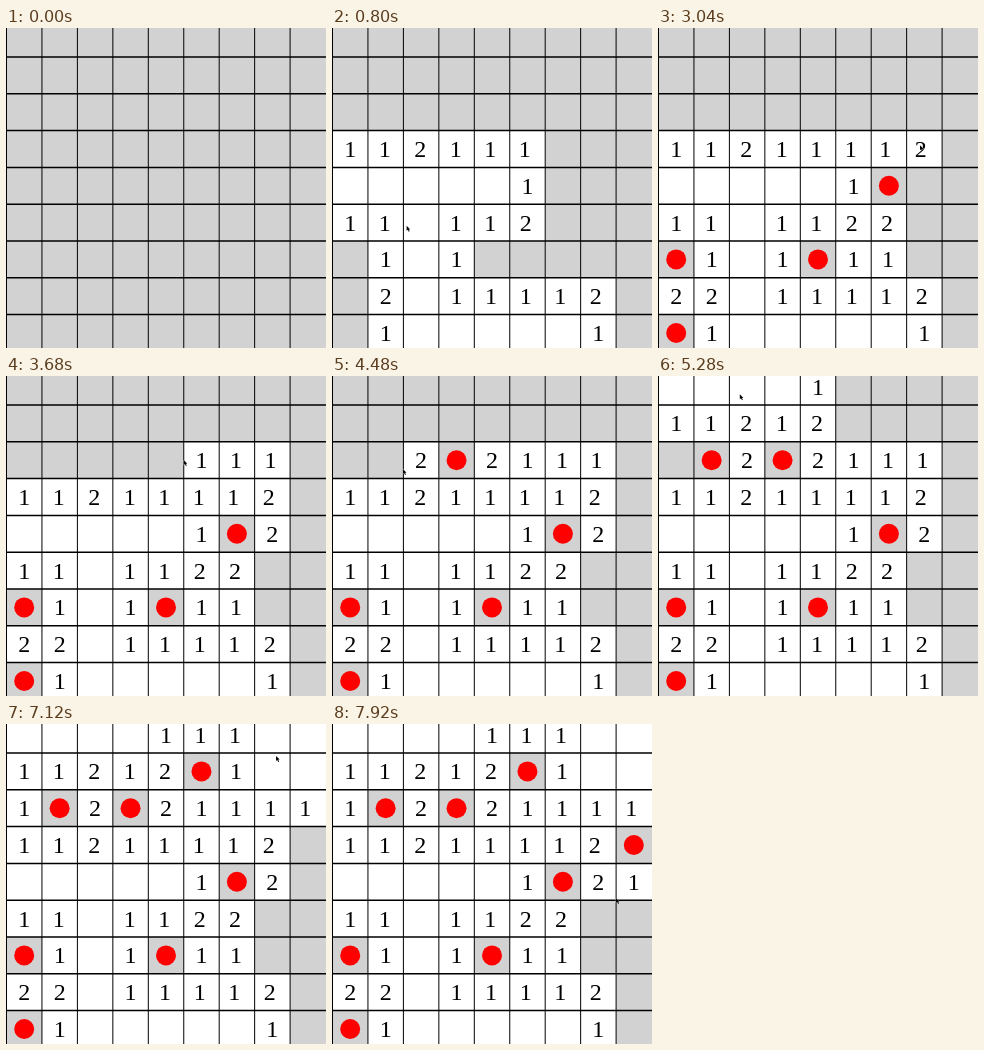
Recreate the animation shown at these times as an HTML page without scripts. Size 320 px wide and 320 px high, loop 8000 ms.

```html
<!DOCTYPE html>
<html lang="en">
<head>
<meta charset="utf-8">
<title>Minesweeper</title>
<style>
  html, body { margin: 0; width: 100%; height: 100%; overflow: hidden; background: #fff; }
  svg { display: block; width: 100%; height: 100%; }
  /* digits and spaces both advance by one column */
  text {
    font: 24px "Liberation Serif", "Times New Roman", serif;
    letter-spacing: 23.45px;
    word-spacing: 6px;
    white-space: pre;
  }
  .cover { fill: #d2d2d2; }
  .flags { fill: #f00; }
  .lines { fill: none; stroke: #000; }
</style>
</head>
<body>
<svg viewBox="0 0 320 320">
  <defs>
    <circle id="flag" cx="18.2" cy="10.6" r="10"/>
  </defs>
  <rect width="320" height="320" fill="#fff"/>

  <g transform="translate(12.2 18.6)">
    <text y="0">    111</text>
    <text y="36.8">11212 1</text>
    <text y="73.6">1 2 21111</text>
    <text y="110.4">11211112</text>
    <text y="147.2">     1 21</text>
    <text y="184">11 1122</text>
    <text y="220.8"> 1 1 11</text>
    <text y="257.6">22 11112</text>
    <text y="294.4"> 1     1</text>
  </g>

  <!-- covers, one unit per cell, lifted in playing order -->
  <g class="cover" transform="translate(.5 -7.8) scale(35.45 36.8)">
    <path d="M7 5h3v4h-2v-2h-1z"/>
    <path d="M5 1h1v1h-1zM1 2h1v1h-1zM3 2h1v1h-1zM8 3h2v1h-2zM6 4h1v1h-1zM0 6h1v1h-1zM4 6h1v1h-1zM0 8h1v1h-1z"/>
    <path d="M0 3h6v3h-6zM1 6h3v1h-3zM1 7h7v2h-7z"><animate attributeName="visibility" values="visible;hidden" keyTimes="0;.09" calcMode="discrete" dur="8s" repeatCount="indefinite"/></path>
    <path d="M0 7h1v1h-1z"><animate attributeName="visibility" values="visible;hidden" keyTimes="0;.16" calcMode="discrete" dur="8s" repeatCount="indefinite"/></path>
    <path d="M5 6h1v1h-1z"><animate attributeName="visibility" values="visible;hidden" keyTimes="0;.22" calcMode="discrete" dur="8s" repeatCount="indefinite"/></path>
    <path d="M6 6h1v1h-1z"><animate attributeName="visibility" values="visible;hidden" keyTimes="0;.25" calcMode="discrete" dur="8s" repeatCount="indefinite"/></path>
    <path d="M6 5h1v1h-1z"><animate attributeName="visibility" values="visible;hidden" keyTimes="0;.27" calcMode="discrete" dur="8s" repeatCount="indefinite"/></path>
    <path d="M6 3h1v1h-1z"><animate attributeName="visibility" values="visible;hidden" keyTimes="0;.33" calcMode="discrete" dur="8s" repeatCount="indefinite"/></path>
    <path d="M7 3h1v1h-1z"><animate attributeName="visibility" values="visible;hidden" keyTimes="0;.36" calcMode="discrete" dur="8s" repeatCount="indefinite"/></path>
    <path d="M7 4h1v1h-1z"><animate attributeName="visibility" values="visible;hidden" keyTimes="0;.4" calcMode="discrete" dur="8s" repeatCount="indefinite"/></path>
    <path d="M7 2h1v1h-1z"><animate attributeName="visibility" values="visible;hidden" keyTimes="0;.42" calcMode="discrete" dur="8s" repeatCount="indefinite"/></path>
    <path d="M6 2h1v1h-1z"><animate attributeName="visibility" values="visible;hidden" keyTimes="0;.44" calcMode="discrete" dur="8s" repeatCount="indefinite"/></path>
    <path d="M5 2h1v1h-1z"><animate attributeName="visibility" values="visible;hidden" keyTimes="0;.45" calcMode="discrete" dur="8s" repeatCount="indefinite"/></path>
    <path d="M4 2h1v1h-1z"><animate attributeName="visibility" values="visible;hidden" keyTimes="0;.47" calcMode="discrete" dur="8s" repeatCount="indefinite"/></path>
    <path d="M2 2h1v1h-1z"><animate attributeName="visibility" values="visible;hidden" keyTimes="0;.51" calcMode="discrete" dur="8s" repeatCount="indefinite"/></path>
    <path d="M0 0h5v2h-5z"><animate attributeName="visibility" values="visible;hidden" keyTimes="0;.63" calcMode="discrete" dur="8s" repeatCount="indefinite"/></path>
    <path d="M0 2h1v1h-1z"><animate attributeName="visibility" values="visible;hidden" keyTimes="0;.7" calcMode="discrete" dur="8s" repeatCount="indefinite"/></path>
    <path d="M5 0h1v1h-1z"><animate attributeName="visibility" values="visible;hidden" keyTimes="0;.83" calcMode="discrete" dur="8s" repeatCount="indefinite"/></path>
    <path d="M6 0h4v3h-2v-1h-2z"><animate attributeName="visibility" values="visible;hidden" keyTimes="0;.88" calcMode="discrete" dur="8s" repeatCount="indefinite"/></path>
    <path d="M8 4h2v1h-2z"><animate attributeName="visibility" values="visible;hidden" keyTimes="0;.97" calcMode="discrete" dur="8s" repeatCount="indefinite"/></path>
  </g>

  <g class="lines">
    <path stroke-width="1" d="M.5 0v320M35.95 0v320M71.4 0v320M106.85 0v320M142.3 0v320M177.75 0v320M213.2 0v320M248.65 0v320M284.1 0v320"/>
    <path stroke-width="1.5" d="M0 29h320M0 65.8h320M0 102.6h320M0 139.4h320M0 176.2h320M0 213h320M0 249.8h320M0 286.6h320"/>
  </g>

  <g class="flags">
    <use href="#flag" x="0" y="220.8"><animate attributeName="visibility" values="hidden;visible" keyTimes="0;.14" calcMode="discrete" dur="8s" repeatCount="indefinite"/></use>
    <use href="#flag" x="0" y="294.4"><animate attributeName="visibility" values="hidden;visible" keyTimes="0;.18" calcMode="discrete" dur="8s" repeatCount="indefinite"/></use>
    <use href="#flag" x="141.8" y="220.8"><animate attributeName="visibility" values="hidden;visible" keyTimes="0;.21" calcMode="discrete" dur="8s" repeatCount="indefinite"/></use>
    <use href="#flag" x="212.7" y="147.2"><animate attributeName="visibility" values="hidden;visible" keyTimes="0;.3" calcMode="discrete" dur="8s" repeatCount="indefinite"/></use>
    <use href="#flag" x="106.35" y="73.6"><animate attributeName="visibility" values="hidden;visible" keyTimes="0;.49" calcMode="discrete" dur="8s" repeatCount="indefinite"/></use>
    <use href="#flag" x="35.45" y="73.6"><animate attributeName="visibility" values="hidden;visible" keyTimes="0;.58" calcMode="discrete" dur="8s" repeatCount="indefinite"/></use>
    <use href="#flag" x="177.25" y="36.8"><animate attributeName="visibility" values="hidden;visible" keyTimes="0;.78" calcMode="discrete" dur="8s" repeatCount="indefinite"/></use>
    <use href="#flag" x="283.6" y="110.4"><animate attributeName="visibility" values="hidden;visible" keyTimes="0;.94" calcMode="discrete" dur="8s" repeatCount="indefinite"/></use>
  </g>

  <!-- pointer -->
  <g>
    <path d="M0 0v5l1.2-1 .9 2 .9-.4-.9-1.9h1.5z" fill="#000" stroke="#fff" stroke-width=".5" paint-order="stroke"/>
    <animate attributeName="visibility" values="hidden;visible" keyTimes="0;.06" calcMode="discrete" dur="8s" repeatCount="indefinite"/>
    <animateTransform attributeName="transform" type="translate" dur="8s" repeatCount="indefinite"
      keyTimes="0;.06;.09;.14;.16;.18;.21;.23;.25;.27;.3;.33;.36;.38;.4;.42;.45;.47;.49;.51;.56;.58;.6;.63;.66;.7;.78;.81;.83;.88;.94;.97;.99;1"
      values="60 0;60 0;88 190;22 228;20 264;20 300;158 230;211 230;228 230;230 194;230 158;232 122;260 119;262 117;264 154;264 86;196 84;160 84;126 84;90 86;71 93;56 84;68 22;80 16;82 18;20 84;192 46;193 27;194 14;264 14;300 120;300 156;284 174;284 174"/>
  </g>
</svg>
</body>
</html>
```
